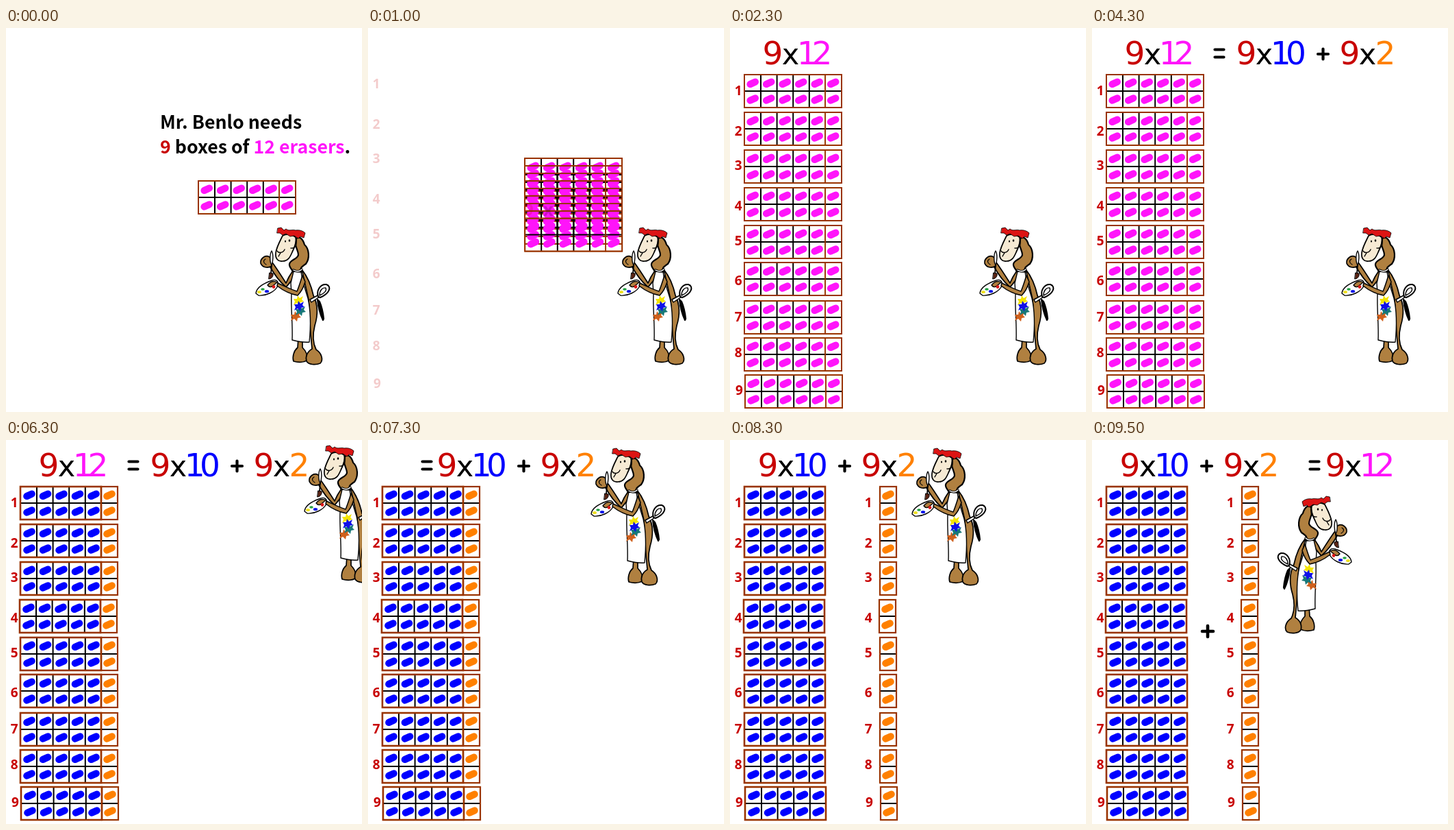
An HTML page for the animation above (9.7 s loop, 520x560 px).

```html
<!DOCTYPE html>
<html lang="en">
<head>
<meta charset="utf-8">
<title>9 x 12 with erasers</title>
<style>
html, body { margin: 0; width: 100%; height: 100%; overflow: hidden; background: #fff; }
svg { display: block; width: 520px; height: 560px; }
.bold { font-family: "Noto Sans CJK SC", "Noto Sans CJK JP", "Open Sans", sans-serif; font-weight: 700; }
.label { font-family: "Open Sans", "Noto Sans", sans-serif; font-weight: 700; }
.sum { font-family: "DejaVu Sans", sans-serif; }
.ink { fill: none; stroke: #000; }
.round { stroke-linecap: round; stroke-linejoin: round; }
</style>
</head>
<body>
<svg id="stage" viewBox="0 0 520 560" xmlns="http://www.w3.org/2000/svg"></svg>
<script>
const LOOP = 9700;
const RED = "#c80000", PINK = "#ff14fa", BLUE = "#0000ff", ORANGE = "#ff8000";
const FRAME = "#993300", FUR = "#b08040";
const packY = [68, 123, 178, 233, 288, 342, 398, 452, 506];
const packShift = [0, 0, 0, -1, 0, 0, 0, 0, 1];
const labelY = [98, 157, 207, 266, 317, 375, 428, 480, 535];
const stage = document.getElementById("stage");
const clamp = (v, lo, hi) => Math.max(lo, Math.min(hi, v));
const times = (n, fn) => Array.from({ length: n }, (_, i) => fn(i)).join("");

function group(markup, parent = stage) {
  const g = document.createElementNS("http://www.w3.org/2000/svg", "g");
  g.innerHTML = markup;
  parent.appendChild(g);
  return g;
}
const show = (g, on) => g.setAttribute("visibility", on ? "visible" : "hidden");
const move = (g, x, y = 0) => g.setAttribute("transform", `translate(${x} ${y})`);

// Eraser boxes
const path = (d, fill, width = 1.7) =>
  `<path class="round" d="${d}" fill="${fill}" stroke="#000" stroke-width="${width}"/>`;
const line = (d, color, width) =>
  `<path class="round" d="${d}" fill="none" stroke="${color}" stroke-width="${width}"/>`;
const pill = (x, y, color) => line(`M${x - 3.7} ${y + 1.7}l7.4 -3.4`, color, 10.2);
const frame = (x, w, width = 2) =>
  `<rect x="${x}" y="0" width="${w}" height="48" fill="none" stroke="${FRAME}" stroke-width="${width}"/>`;
const pills = (n, x, color) =>
  times(n * 2, i => pill(x + 23.5 * (i >> 1), 12.3 + 23.7 * (i % 2), color));
const grid = (n, w) => {
  const bars = times(n - 1, i => `M${24 + 23.6 * i} 0V48`);
  return `<path class="ink" stroke-width="2" d="M0 24H${w}${bars}"/>`;
};
const pinkPack = grid(5, 142) + frame(0, 118, 1.6) + frame(118, 24, 1.6) + frame(0, 142) + pills(6, 12.2, PINK);
const bluePack = grid(5, 118) + frame(0, 118, 2.6) + pills(5, 13, BLUE);
const orangePack = grid(1, 24) + frame(0, 24, 2.2) + pills(1, 12, ORANGE);
const column = (pack, x) => packY.map((y, i) =>
  `<g transform="translate(${x + packShift[i]} ${y})">${pack}</g>`).join("");
const labels = times(9, i =>
  `<text class="label" font-size="19" fill="${RED}" x="${i < 8 ? 6.8 : 8}" y="${labelY[i]}">${i + 1}</text>`);

// Sums: glyphs are placed by the left edge of their ink
const bearing = { 0: .066, 1: .11, 2: .073, 9: .055, x: .029 };
function glyph(ch, x, color) {
  const size = ch === "x" ? 43 : 47;
  return `<text class="sum" font-size="${size}" fill="${color}"
    x="${x - bearing[ch] * size}" y="53">${ch}</text>`;
}
function term(x, number, color) {
  const digits = [...number].map((d, i) => glyph(d, x + 53 + 20 * i, color)).join("");
  return glyph("9", x, RED) + glyph("x", x + 27, "#000") + digits;
}
const equals = x => line(`M${x + 2.5} 31.5h13M${x + 2.5} 42.5h13`, "#000", 4.2);
const plus = (x, y, r, w) => line(`M${x - r} ${y}h${2 * r}M${x} ${y - r}v${2 * r}`, "#000", w);

// Painter camel
const dot = (x, y, rx, ry, fill) => `<ellipse cx="${x}" cy="${y}" rx="${rx}" ry="${ry}" fill="${fill}"/>`;
const splat = (x, y, color) =>
  `<path fill="${color}" d="M${x - 7} ${y - 3}l5 0l1 -5l3 4l5 -3l-2 5l3 3l-5 1l-1 5l-4 -4l-5 3l2 -5z"/>`;
const camelArt = [
  // tail, legs and feet
  path("M455 396C456 406 459 418 463 426L464 424C463 414 461 406 458 399Z", "#000", 2.2),
  path("M427 452L426 466C420 471 418 480 420 486C427 488 436 488 440 484C441 476 437 470 433 466L433 452Z", FUR),
  path("M432 352C440 362 446 376 449 390C455 402 456 418 451 434C448 446 448 459 453 469C461 474 464 484 459 489C452 492 442 491 439 486C437 479 440 472 447 468L445 446L442 396Z", FUR),
  // neck and head
  path("M424 307C430 303 434 309 436 316C443 322 444 336 438 344C432 348 429 350 431 356L420 358C420 353 413 350 414 344C416 337 425 338 427 331C427 323 420 318 424 307Z", FUR, 2.2),
  path("M404 303C400 311 395 320 394 328C393 337 398 341 404 340C412 340 415 334 418 327C422 319 425 312 423 305C417 300 409 300 404 303Z", "#f6ead4"),
  line("M424 309C425 317 422 322 416 321M396 325C398 329 405 328 407 323M401 328L398 333", "#000", 1.4),
  dot(414, 310, 1.3, 1.7, "#000"), dot(408, 311, 1, 1.5, "#000"),
  path("M397 292L402 291L406 295L409 293C414 297 418 293 423 295C429 294 434 296 437 299L435 306L430 304L427 307L421 303L415 304L409 300L404 302L400 299L396 299Z", "#dc1414", .8),
  // raised arm
  path("M419 354C414 361 411 367 409 372C402 361 395 350 389 342L385 347C391 358 400 370 409 378C413 373 418 368 421 362Z", FUR),
  // apron
  path("M420 355L431 356C433 370 437 382 441 394C446 416 445 438 443 458C435 459 426 457 418 455C419 432 416 410 417 388L416 372Z", "#fff", 1.4),
  line("M420 353Q427 357 432 352", "#000", 3.2),
  line("M420 353Q427 357 432 352", "#fff", 1.4),
  // bow
  path("M444 396L457 389L458 392L446 400Z", "#fff", 1.5),
  path("M456 392C453 383 459 373 468 374C476 377 473 387 459 393Z", "#fff", 2),
  path("M458 390C458 383 462 378 467 379C469 383 465 387 458 390Z", "#fff", 1.4),
  splat(427, 398, "#f4e400"), splat(423, 421, "#d0601c"),
  splat(430, 413, "#187878"), splat(428, 406, "#1010e8"),
  // palette
  path("M365 387C366 378 376 373 386 369C394 365 399 369 397 376C393 385 379 391 369 390Z", "#fff", 1.4),
  dot(370, 385, 3, 2, "#f0e020"), dot(375, 381, 2.8, 1.8, "#20a040"),
  dot(381, 384, 3.2, 2, "#0a14e8"),
  // palette arm
  path("M433 361C430 370 428 377 425 384C415 381 406 376 397 372L396 376C405 383 415 388 426 390C431 385 435 377 437 370Z", FUR, 1.5),
  path("M396 371C391 368 386 370 382 375C385 379 388 378 391 375Z", FUR, 1.3),
  dot(391, 377.5, 2.4, 2.4, "#e01818"),
  // brush and hand
  path("M385 334C378 330 371 337 372 343C374 349 382 351 388 347C389 343 388 337 385 334Z", FUR, 1.7),
  line("M379 337C375 339 376 343 380 345", "#000", 1.2),
  path("M388 325C391 330 390 341 388 346C385 341 385 330 388 325Z", "#fff", 1.4),
  line("M388 345L387 358", "#000", 1.8),
  path("M385 357L390 358C391 363 387 366 384 366Z", "#5a2414", 1)
].join("");

// Scene, back to front
const intro = group(`<g class="bold" font-size="26.7">
  <text x="225" y="147">Mr. Benlo needs</text>
  <text x="225" y="183"><tspan fill="${RED}">9</tspan> boxes of <tspan fill="${PINK}">12 erasers</tspan>.</text></g>`);
const pinkPacks = packY.map(() => group(pinkPack));
const splitPacks = group(column(bluePack, 21));
const orangePacks = group(column(orangePack, 0));
const numbers = group(labels);
const numbersTwo = group(labels);
const ghost = group(`<text class="label" font-size="25" x="227.5" y="274"><tspan fill="${RED}">9</tspan><tspan x="256">x</tspan></text>`);
const product = group(term(50, "12", PINK));
const equalSign = group(equals(0));
const parts = group(term(213, "10", BLUE) + plus(337.5, 38, 7.5, 4.2) + term(364, "2", ORANGE));
const bigPlus = group(plus(169, 279, 8, 4.6));
const answer = group(equals(316) + term(343, "12", PINK));
const camel = group(camelArt);

function camelPose(t) {
  if (t < 6300) return "";
  if (t < 7300) return "translate(71 -283)";
  if (t < 7500) return "translate(-39 -279)";
  if (t < 8700) return "translate(-99 -279)";
  return "translate(744 -209) scale(-1 1)";
}

function draw(t) {
  const step = (start, most) => clamp(Math.floor((t - start) / 200) + 1, 0, most);

  // the stack fans out in five steps
  const n = step(1000, 5), k = n / 5, lift = n < 2 ? 10 : 0;
  show(intro, t < 1000);
  pinkPacks.forEach((g, i) => {
    show(g, t < 6300 && (n > 0 || i === 0));
    const endX = i < 8 ? 21 : 22;
    move(g, 281 + (endX - 281) * k, 233 + (packY[i] - 233) * k - lift);
  });
  numbers.setAttribute("opacity", k);
  move(numbers, 0, n ? -lift : 0);
  show(ghost, n > 0 && n < 5);
  ghost.setAttribute("opacity", k);

  // tens and ones come apart
  const s = step(7900, 3) / 3;
  show(splitPacks, t >= 6300);
  show(orangePacks, t >= 6300);
  move(orangePacks, 139 + 80 * s);
  show(numbersTwo, s > 0);
  move(numbersTwo, 190 * s);

  const push = t < 7300 ? 0 : t < 7500 ? 1 : 2;
  show(product, t >= 2300 && t < 7300);
  show(equalSign, t >= 4300 && t < 7700);
  move(equalSign, [177, 77, 7][push]);
  show(parts, t >= 4300);
  move(parts, [0, -110, -170][push]);

  show(bigPlus, t >= 8500);
  show(answer, t >= 8900);
  move(answer, 50 * (4 - step(8900, 4)));
  camel.setAttribute("transform", camelPose(t));
}

const began = performance.now();
function tick() {
  draw((performance.now() - began) % LOOP);
  requestAnimationFrame(tick);
}
tick();
</script>
</body>
</html>
```
